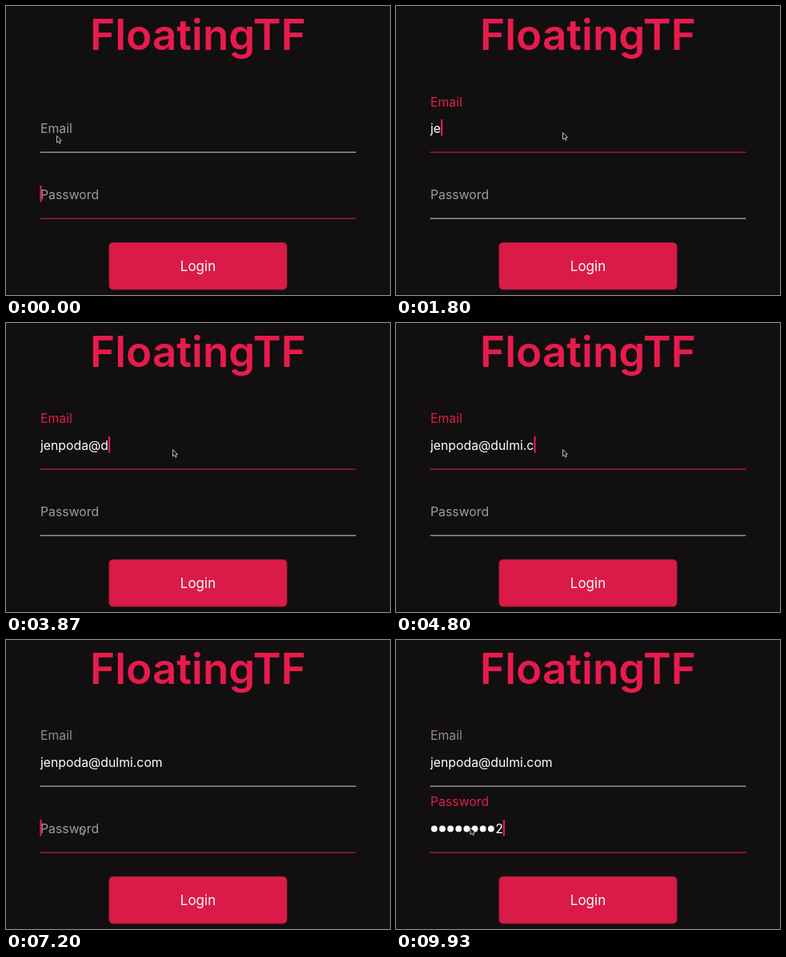
Write an HTML page with a canvas that moves like this. It is 480 px wide and 362 px high and loops after 9990 ms.

```html
<!DOCTYPE html>
<html lang="en">
<head>
<meta charset="utf-8">
<title>Login form</title>
<style>
  html, body { margin: 0; width: 100%; height: 100%; overflow: hidden; background: #120f10; }
  canvas { display: block; width: 480px; height: 362px; }
</style>
</head>
<body>
<canvas id="stage"></canvas>
<script>
const W = 480, H = 362, LOOP = 9990;
const LEFT = 43, RIGHT = 437;
const FONT = 'Inter, "Open Sans", sans-serif';
const TEXT_SIZE = 15.8;
const PINK = [222, 30, 76], GRAY = [160, 157, 158], MUTED = [148, 140, 143];
const FOCUS_EMAIL = 600, FOCUS_PASSWORD = 7200;
const KEY_STEP = 130, LIFT_TIME = 300;
const FADE = 200, BLINK = 950;

const canvas = document.getElementById('stage');
const ctx = canvas.getContext('2d');
const dpr = window.devicePixelRatio || 1;
canvas.width = W * dpr;
canvas.height = H * dpr;

const clamp = v => Math.min(1, Math.max(0, v));
const smooth = v => v * v * (3 - 2 * v);
const easeOut = v => 1 - (1 - v) ** 3;
const mix = (a, b, k) => a + (b - a) * k;
const rgb = (a, b = a, k = 0) => `rgb(${a.map((v, i) => Math.round(mix(v, b[i], k)))})`;

// A burst of typing: one key press per letter at an even pace
const burst = (start, text, step = KEY_STEP) =>
  [...text].map((char, i) => ({ char, time: start + i * step }));

const email = {
  label: 'Email', base: 159,
  keys: [burst(1600, 'jenp'), burst(2470, 'oda'), burst(3400, '@'),
         burst(3870, 'dulmi'), burst(4670, '.com', 110)].flat()
};
const password = {
  label: 'Password', base: 242, secret: true,
  keys: [burst(8270, 'pass'), burst(8930, 'word2', 225)].flat()
};

function type(str, x, y, size, color, weight = 400) {
  ctx.font = `${weight} ${size}px ${FONT}`;
  ctx.fillStyle = color;
  ctx.fillText(str, x, y);
}

// Solid for a moment, then fade out, pause, fade in, repeat
function caretAlpha(idle, hold) {
  if (idle < hold) return 1;
  const phase = (idle - hold) % BLINK;
  return phase < 2 * FADE ? 1 - clamp(phase / FADE) : clamp(phase / FADE - 2);
}

function drawValue(field, typed) {
  const text = typed.map(key => key.char).join('');
  let x = LEFT;
  if (field.secret) {
    ctx.fillStyle = '#fff';
    for (let i = 1; i < text.length; i++, x += 10.15) {
      ctx.beginPath();
      ctx.arc(x + 4.8, field.base - 5.5, 3.9, 0, Math.PI * 2);
      ctx.fill();
    }
  }
  const shown = field.secret ? text.slice(-1) : text;
  type(shown, x, field.base, TEXT_SIZE, '#fff');
  return x + ctx.measureText(shown).width;
}

function drawField(field, t, focused, focusTime) {
  const typed = field.keys.filter(key => key.time <= t);
  const lift = easeOut(clamp((t - field.keys[0].time) / LIFT_TIME));
  const color = rgb(GRAY, focused ? PINK : MUTED, lift);
  type(field.label, LEFT, field.base - 34.5 * lift, TEXT_SIZE, color);

  const end = drawValue(field, typed);
  ctx.fillStyle = focused ? '#c32148' : '#b4b2b3';
  ctx.fillRect(LEFT - 0.4, field.base + 23.6, RIGHT - LEFT + 0.8, 1.2);

  if (focused) {
    const last = typed.at(-1);
    ctx.globalAlpha = last ? caretAlpha(t - last.time, 600) : caretAlpha(t - focusTime, 330);
    ctx.fillStyle = rgb(PINK);
    ctx.fillRect(last ? end : LEFT - 0.6, field.base - 17, 2.2, 20.5);
    ctx.globalAlpha = 1;
  }
}

function drawButton() {
  ctx.beginPath();
  ctx.roundRect(129, 296.5, 222, 58.5, 4.5);
  ctx.fillStyle = '#da1b48';
  ctx.fill();
  ctx.strokeStyle = '#ab1c3e';
  ctx.lineWidth = 1;
  ctx.stroke();
  ctx.textAlign = 'center';
  type('Login', 240, 332, 17, '#fff');
  ctx.textAlign = 'left';
}

// Across the email field, then in a bend down to the password field
function pointerAt(t) {
  const over = smooth(clamp((t - 70) / 530));
  const down = smooth(clamp((t - 5600) / 1130));
  return [mix(mix(63.5, 208.5, over), 93, down ** 2),
          mix(mix(162.5, 158.5, over), 235, down ** 1.2)];
}

function drawPointer(t) {
  const [x, y] = pointerAt(t);
  const shape = [[0, 0], [0, 8.6], [2, 6.9], [3.4, 9.7], [4.7, 9], [3.5, 6.3], [6, 6]];
  ctx.beginPath();
  shape.forEach(([dx, dy]) => ctx.lineTo(x + dx, y + dy));
  ctx.closePath();
  ctx.fillStyle = '#151213';
  ctx.fill();
  ctx.strokeStyle = '#c9c7c8';
  ctx.lineWidth = 0.9;
  ctx.stroke();
}

function draw(t) {
  ctx.setTransform(dpr, 0, 0, dpr, 0, 0);
  ctx.fillStyle = '#120f10';
  ctx.fillRect(0, 0, W, H);
  ctx.textAlign = 'center';
  type('FloatingTF', 240, 55, 53, '#e81b4d', 600);
  ctx.textAlign = 'left';

  const onEmail = t >= FOCUS_EMAIL && t < FOCUS_PASSWORD;
  drawField(email, t, onEmail, FOCUS_EMAIL);
  drawField(password, t, !onEmail, t < FOCUS_EMAIL ? 0 : FOCUS_PASSWORD);
  drawButton();
  drawPointer(t);
}

const start = performance.now();
function tick() {
  draw((performance.now() - start) % LOOP);
  requestAnimationFrame(tick);
}
tick();
</script>
</body>
</html>
```
